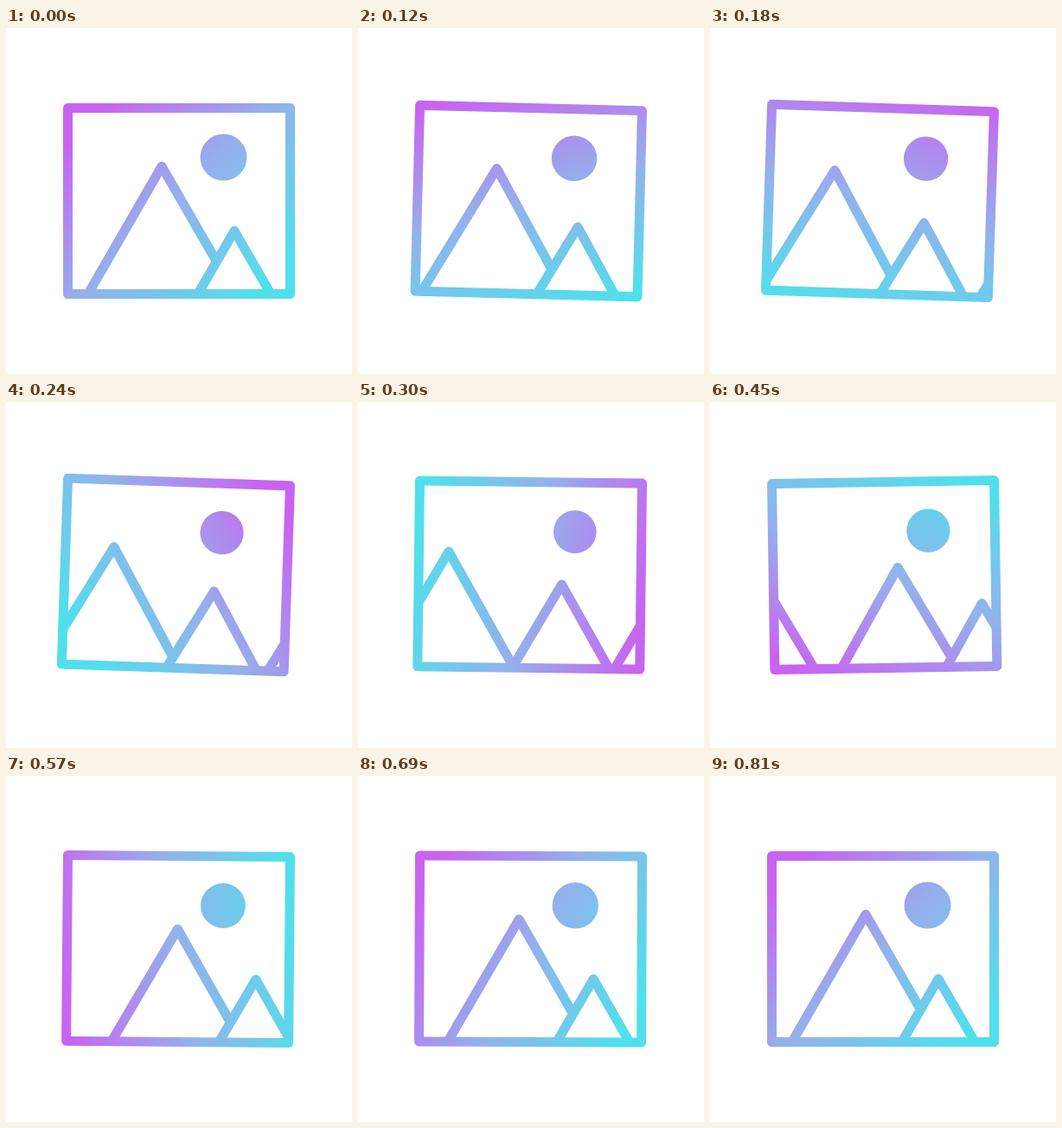
Animation of 400x400 px, one loop 2.87 s. Source, as an HTML page with a canvas:

```html
<!DOCTYPE html>
<html lang="en">
<head>
<meta charset="utf-8">
<title>Picture icon</title>
<style>
  html, body { margin: 0; width: 100%; height: 100%; overflow: hidden; background: #fff; }
  canvas { display: block; }
</style>
</head>
<body>
<canvas id="stage" width="400" height="400"></canvas>
<script>
const ctx = document.getElementById('stage').getContext('2d');
const LOOP = 2870, MOVE = 810, STEP = 30;
const PIVOT = { x: 200, y: 92.5 };
const FRAME = [71.5, 92.5, 257, 215];
const SLOPE = Math.sqrt(3);

// The swing's first segment starts before zero so it sets off at full speed.
const SWING = [[-225, -2], [225, 2], [400, -1.25], [570, 0.5], [MOVE, 0]];
const SUN = [[0, 27], [320, 24.8], [MOVE, 27]];

// Peaks at the start and end of the move, back to front.
const PEAKS = [
  [180, 160, -50, 204],
  [264, 234.5, 180, 160],
  [378, 234.5, 264, 234.5]
];

const mix = (a, b, k) => a + (b - a) * k;
const smooth = k => k * k * (3 - 2 * k);

function keyed(keys, t) {
  const i = Math.max(1, keys.findIndex(key => t <= key[0]));
  const [t0, v0] = keys[i - 1], [t1, v1] = keys[i];
  return mix(v0, v1, smooth((t - t0) / (t1 - t0)));
}

function gradient(u) {
  const turn = smooth(u + 0.08 * Math.sin(Math.PI * u) ** 2);
  const angle = Math.PI * (0.25 + 2 * turn);
  const dx = 140 * Math.cos(angle), dy = 140 * Math.sin(angle);
  const g = ctx.createLinearGradient(200 - dx, 200 - dy, 200 + dx, 200 + dy);
  g.addColorStop(0, '#c864f0');
  g.addColorStop(0.5, '#94b1ec');
  g.addColorStop(1, '#50e0eb');
  return g;
}

function mountain(x, y) {
  const base = 330, half = (base - y) / SLOPE;
  ctx.beginPath();
  ctx.moveTo(x - half, base);
  ctx.lineTo(x, y);
  ctx.lineTo(x + half, base);
  ctx.fill();
  ctx.stroke();
}

function draw(t) {
  const u = t / MOVE;
  const shift = mix(u, smooth(u), 0.8);
  const paint = gradient(u);

  ctx.fillStyle = '#fff';
  ctx.fillRect(0, 0, 400, 400);
  ctx.save();
  ctx.translate(PIVOT.x, PIVOT.y);
  ctx.rotate(keyed(SWING, t) * Math.PI / 180);
  ctx.translate(-PIVOT.x, -PIVOT.y);
  ctx.strokeStyle = paint;
  ctx.lineWidth = 11;
  ctx.lineJoin = 'round';

  ctx.save();
  ctx.beginPath();
  ctx.rect(...FRAME);
  ctx.clip();
  for (const [x0, y0, x1, y1] of PEAKS) mountain(mix(x0, x1, shift), mix(y0, y1, shift));
  ctx.restore();

  ctx.strokeRect(...FRAME);
  ctx.fillStyle = paint;
  ctx.beginPath();
  ctx.arc(251.5, 149.5, keyed(SUN, t), 0, 2 * Math.PI);
  ctx.fill();
  ctx.restore();
}

const start = performance.now();
function tick() {
  const t = (performance.now() - start) % LOOP;
  draw(Math.min(MOVE, Math.floor(t / STEP) * STEP));
  requestAnimationFrame(tick);
}
tick();
</script>
</body>
</html>
```
